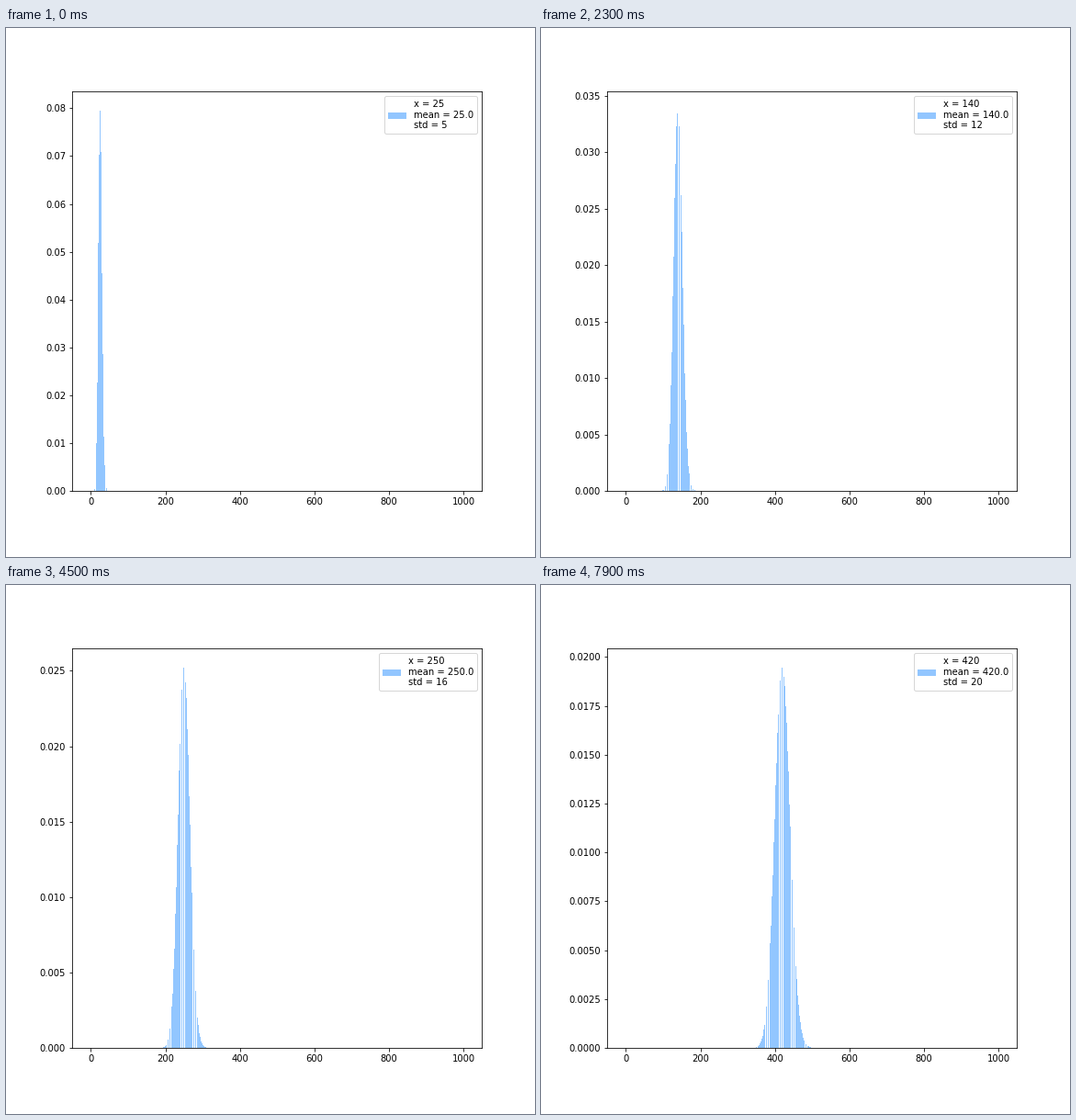
A matplotlib script that plays this animation: 576x576 px, repeating every 8000 ms.

```python
from math import lgamma, log, sqrt

import matplotlib.pyplot as plt
import numpy as np
from matplotlib.animation import FuncAnimation

FRAMES, INTERVAL = 80, 100
START, STEP = 25, 5
COLOR = "#92C6FF"

k = np.arange(560)
log_fact = np.array([lgamma(n + 1) for n in k])


def poisson(mean):
    return np.exp(k * log(mean) - mean - log_fact)


def spread(mean):
    # half of the whole-bin width of the one-sigma band
    return round(int(2 * sqrt(mean)) / 2)


fig, ax = plt.subplots(figsize=(8, 8), dpi=72)
fig.subplots_adjust(left=0.125, right=0.9, bottom=0.125, top=0.88)
bars = ax.bar(k, np.zeros(len(k)), width=0.8, color=COLOR)
# limits for bars 0..999 with a 5 % margin on each side
ax.set_xlim(-50.39, 1049.39)


def update(i):
    mean = START + STEP * i
    pmf = poisson(mean)
    peak = pmf.max()
    for bar, p in zip(bars, pmf):
        bar.set_height(p)
        bar.set_visible(p > peak * 1e-4)
    ax.set_ylim(0, 1.05 * peak)
    label = f"x = {mean}\nmean = {mean:.1f}\nstd = {spread(mean)}"
    swatch = plt.Rectangle((0, 0), 1, 1, facecolor=COLOR, linewidth=0)
    ax.legend([swatch], [label], loc="upper right")
    return []


anim = FuncAnimation(fig, update, frames=FRAMES, interval=INTERVAL,
                     init_func=lambda: update(0), repeat=True, repeat_delay=0)
plt.show()
```
